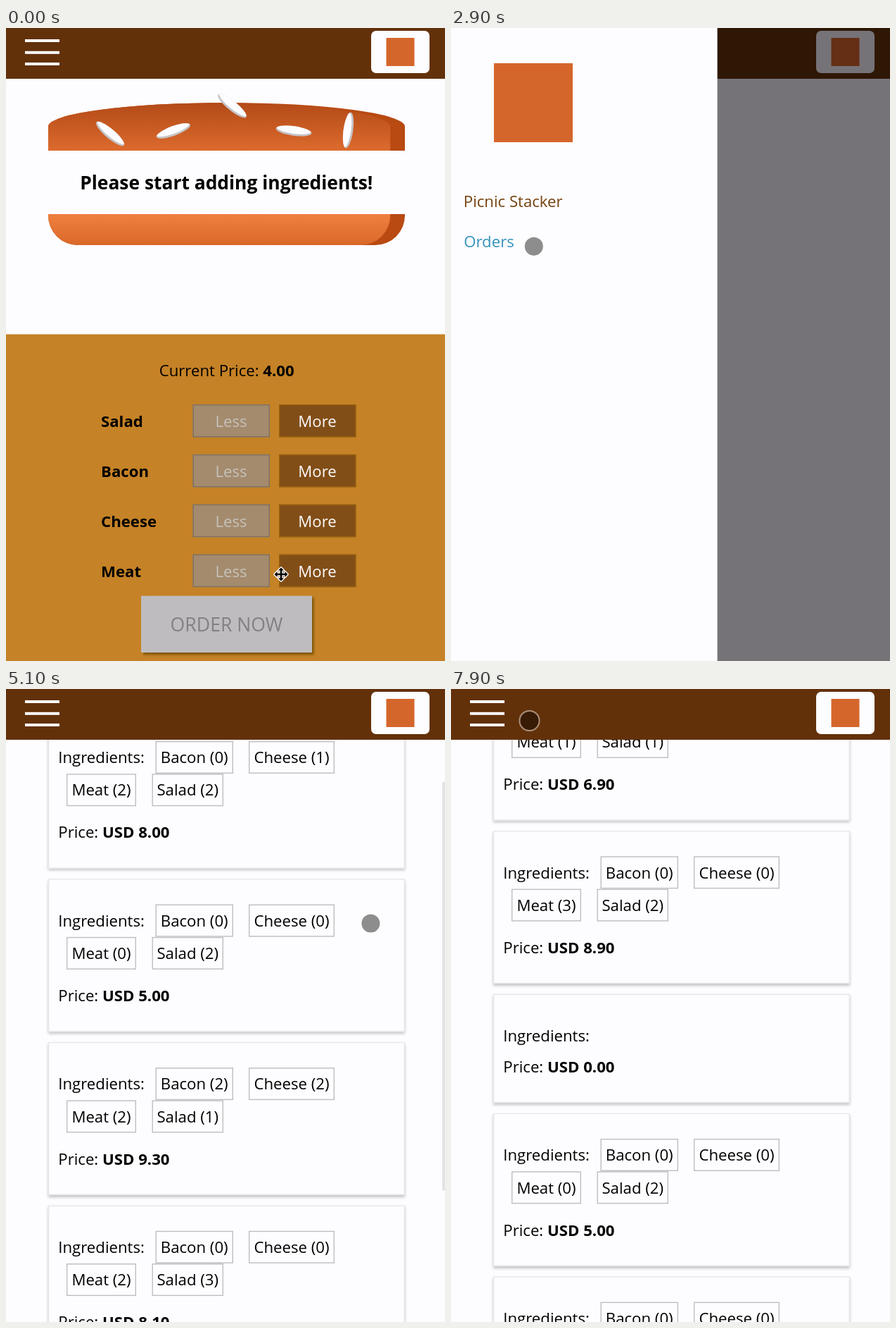
These frames come from a looping animation (624 by 898 pixels, 8000 ms). An HTML page with a canvas:

```html
<!DOCTYPE html>
<html lang="en">
<head>
<meta charset="utf-8">
<title>Burger order app</title>
<style>
html, body { margin: 0; width: 100%; height: 100%; overflow: hidden; background: #fdfcfe; }
canvas { display: block; }
</style>
</head>
<body>
<canvas id="stage" width="624" height="898"></canvas>
<script>
const ctx = document.getElementById('stage').getContext('2d');
const W = 624, H = 898, LOOP = 8000, STEP = 100, FONT = 22.19;
const WHITE = '#fdfcfe', BROWN = '#633109', BLUE = '#3493bb', LINK = '#74410f';
const DRAWER_W = 378.6, SCROLL_MAX = 1515;

// Orders as [bacon, cheese, meat, salad]; null is an empty order
const orders = [[0, 1, 2, 2], [0, 1, 2, 2], [0, 0, 0, 2], [2, 2, 2, 1], [0, 0, 2, 3], [0, 0, 0, 2],
  [1, 1, 1, 1], [0, 0, 3, 2], null, [0, 0, 0, 2], [0, 0, 0, 2]];
const prices = [0.7, 0.4, 1.3, 0.5];
// name, x, width, row
const tags = [['Bacon', 212.5, 110.5, 0], ['Cheese', 345, 122, 0], ['Meat', 86, 99, 1], ['Salad', 207.5, 101.5, 1]];

// Tracks: [time, ...values]
const pointer = [[100, 391, 775], [900, 71, 28], [1100, 71, 28], [1900, 119, 258], [2100, 119, 258],
  [2700, 117.8, 309.8], [3700, 117.8, 309.8], [4250, 518.4, 332.5], [6800, 518.4, 332.5],
  [7200, 588, 50], [7500, 588, 50], [7900, 111.5, 45]];
const scrollTrack = [[4750, 0], [5150, 330], [5600, 1021.5], [6100, SCROLL_MAX]];
const bounceTrack = [[6050, 0], [6200, 30], [6400, 19], [6800, 0]];

const clamp = v => Math.max(0, Math.min(1, v));
const smooth = u => u * u * (3 - 2 * u);
const easeOut = u => 1 - (1 - u) ** 2;
const linear = u => u;

function track(keys, t, ease = smooth) {
  if (t <= keys[0][0]) return keys[0].slice(1);
  for (let i = 1; i < keys.length; i++) {
    const a = keys[i - 1], b = keys[i];
    if (t <= b[0]) {
      const u = ease((t - a[0]) / (b[0] - a[0]));
      return a.slice(1).map((v, k) => v + (b[k + 1] - v) * u);
    }
  }
  return keys[keys.length - 1].slice(1);
}

function rect(x, y, w, h, fill, stroke) {
  ctx.fillStyle = fill;
  ctx.fillRect(x, y, w, h);
  if (stroke) {
    ctx.strokeStyle = stroke;
    ctx.lineWidth = 1.4;
    ctx.strokeRect(x + 0.7, y + 0.7, w - 1.4, h - 1.4);
  }
}

function text(str, x, y, { color = '#000', bold = false, size = FONT, align = 'left' } = {}) {
  ctx.font = `${bold ? 700 : 400} ${size}px "Open Sans", "Noto Sans", sans-serif`;
  ctx.textAlign = align;
  ctx.fillStyle = color;
  ctx.fillText(str, x, y);
  return x + ctx.measureText(str).width;
}

function shadowed(color, dx, dy, blur, draw) {
  ctx.save();
  Object.assign(ctx, { shadowColor: color, shadowOffsetX: dx, shadowOffsetY: dy, shadowBlur: blur });
  draw();
  ctx.restore();
}

// Shape with an inner shadow: dark base, light copy shifted inside it
function inset(path, dark, light, dx, dy) {
  ctx.save();
  ctx.fillStyle = dark;
  ctx.fill(path);
  ctx.clip(path);
  ctx.translate(dx, dy);
  ctx.fillStyle = light;
  ctx.fill(path);
  ctx.restore();
}

function gradient(y0, y1, from, to) {
  const g = ctx.createLinearGradient(0, y0, 0, y1);
  g.addColorStop(0, from);
  g.addColorStop(1, to);
  return g;
}

function seed(x, y, degrees) {
  ctx.save();
  ctx.translate(x, y);
  ctx.rotate(degrees * Math.PI / 180);
  const p = new Path2D();
  p.ellipse(0, 0, 25.5, 6.8, 0, 0, 7);
  inset(p, '#c6c4c7', WHITE, 0, -2.8);
  ctx.restore();
}

function burger() {
  const top = new Path2D();
  top.ellipse(313.5, 140, 253.5, 34, 0, Math.PI, 2 * Math.PI);
  top.lineTo(567, 174);
  top.lineTo(60, 174);
  top.closePath();
  inset(top, '#b84a12', gradient(106, 174, '#b34a18', '#dc6b2d'), -20.8, 0);
  seed(148, 150, 40);
  seed(238, 146, -20);
  seed(321.5, 110.5, 39);
  seed(409, 146, 8);
  seed(486.5, 145, -82);
  const bottom = new Path2D();
  bottom.roundRect(60, 264, 507, 44, [0, 0, 42, 42]);
  inset(bottom, '#b84a12', gradient(264, 308, '#ee8040', '#da682a'), -20.8, 0);
}

function builderPage() {
  burger();
  text('Please start adding ingredients!', 313.3, 228.6, { bold: true, size: 26.4, align: 'center' });
  rect(0, 434.5, W, H, '#c58226');
  const x = text('Current Price: ', 217.7, 493.5);
  text('4.00', x, 493.5, { bold: true });
  ['Salad', 'Bacon', 'Cheese', 'Meat'].forEach((name, i) => {
    const y = 534 + i * 70.9;
    text(name, 135, y + 31.8, { bold: true });
    rect(265.5, y, 109.5, 46.5, '#a48b6d', '#7d7062');
    text('Less', 320, y + 31.8, { color: '#c6c1bc', align: 'center' });
    rect(388, y, 109.5, 46.5, '#824e17', '#97600f');
    text('More', 442.5, y + 31.8, { color: WHITE, align: 'center' });
  });
  shadowed('#7a5507', 2.8, 2.8, 3, () => rect(192, 805.5, 243, 80.5, '#bfbcbf'));
  text('ORDER NOW', 313.5, 855.5, { color: '#838083', size: 26.6, align: 'center' });
}

function orderCard(order, y) {
  const h = order ? 217 : 154.5;
  shadowed('#c4c3c6', 0, 2.8, 4, () => rect(60, y, 507, h, WHITE));
  rect(60, y, 507, h, WHITE, '#e8e7ea');
  text('Ingredients:', 74.3, y + 67.5);
  let total = 0;
  if (order) {
    total = 4;
    tags.forEach(([name, x, w, row], i) => {
      const top = y + 36.3 + row * 46.3;
      total += order[i] * prices[i];
      rect(x, top, w, 46, WHITE, '#bebdc0');
      text(`${name} (${order[i]})`, x + w / 2, top + 31.2, { align: 'center' });
    });
  }
  const base = y + (order ? 173.8 : 111.4);
  text('USD ' + total.toFixed(2), text('Price: ', 74.3, base), base, { bold: true });
  return h + 14.6;
}

function ordersPage(t, scroll) {
  let y = 94.8 - scroll;
  for (const order of orders) y += orderCard(order, y);
  ctx.globalAlpha = clamp((t - 4750) / 100) * clamp((7100 - t) / 250);
  rect(620, Math.min(scroll, SCROLL_MAX) * 0.456, 4, 580, '#e4e3e5');
  ctx.globalAlpha = 1;
}

function header(y) {
  rect(0, y - 40, W, 112, BROWN);
  for (const bar of [16, 32.8, 49]) rect(27, y + bar, 49, 4, WHITE);
  ctx.fillStyle = WHITE;
  ctx.beginPath();
  ctx.roundRect(519, y + 4, 83, 60, 7);
  ctx.fill();
  rect(540.5, y + 14, 40, 40, '#d5662b');
}

function backdrop() {
  ctx.globalCompositeOperation = 'multiply';
  rect(0, 0, W, H, '#777478');
  ctx.globalCompositeOperation = 'source-over';
}

function drawer(t, open, onOrders) {
  const x = -DRAWER_W * (1 - open);
  rect(x, 0, DRAWER_W, H, WHITE);
  rect(x + 61, 50, 112, 112, '#d5662b');
  text('Picnic Stacker', x + 17.8, 253.5, { color: onOrders ? LINK : BLUE });
  text('Orders', x + 18.2, 310.5, { color: t > 2400 ? BLUE : LINK });
}

function moveCursor(x, y) {
  ctx.save();
  ctx.translate(x, y);
  ctx.lineJoin = 'round';
  const p = new Path2D();
  for (let k = 0; k < 4; k++) {
    const arm = new Path2D('M-1.3 0V-5.5H-4L0-9.5L4-5.5H1.3V0Z');
    p.addPath(arm, new DOMMatrix().rotate(k * 90));
  }
  ctx.strokeStyle = '#fff';
  ctx.lineWidth = 2.6;
  ctx.stroke(p);
  ctx.fillStyle = '#000';
  ctx.fill(p);
  ctx.restore();
}

function touchDot(x, y) {
  ctx.beginPath();
  ctx.arc(x, y, 13.1, 0, 7);
  ctx.fillStyle = 'rgba(0,0,0,.44)';
  ctx.fill();
  ctx.beginPath();
  ctx.arc(x, y, 14.1, 0, 7);
  ctx.strokeStyle = 'rgba(255,255,255,.45)';
  ctx.lineWidth = 2;
  ctx.stroke();
}

function draw(t) {
  const onOrders = t >= 2900;
  const bounce = track(bounceTrack, t)[0];
  const scroll = track(scrollTrack, t, linear)[0] + bounce;
  const open = easeOut(clamp((t - 1000) / 300)) * (1 - easeOut(clamp((t - 4300) / 300)));
  rect(0, 0, W, H, WHITE);
  if (!onOrders) builderPage();
  else if (t >= 3300) ordersPage(t, scroll);
  header(-bounce);
  if (t >= 1000 && t < 4300) backdrop();
  if (open > 0) drawer(t, open, onOrders);
  const [x, y] = track(pointer, t);
  (t < 100 ? moveCursor : touchDot)(x, y);
}

const start = performance.now();
function frame() {
  const t = (performance.now() - start) % LOOP;
  draw(Math.floor(t / STEP) * STEP);
  requestAnimationFrame(frame);
}
frame();
</script>
</body>
</html>
```
